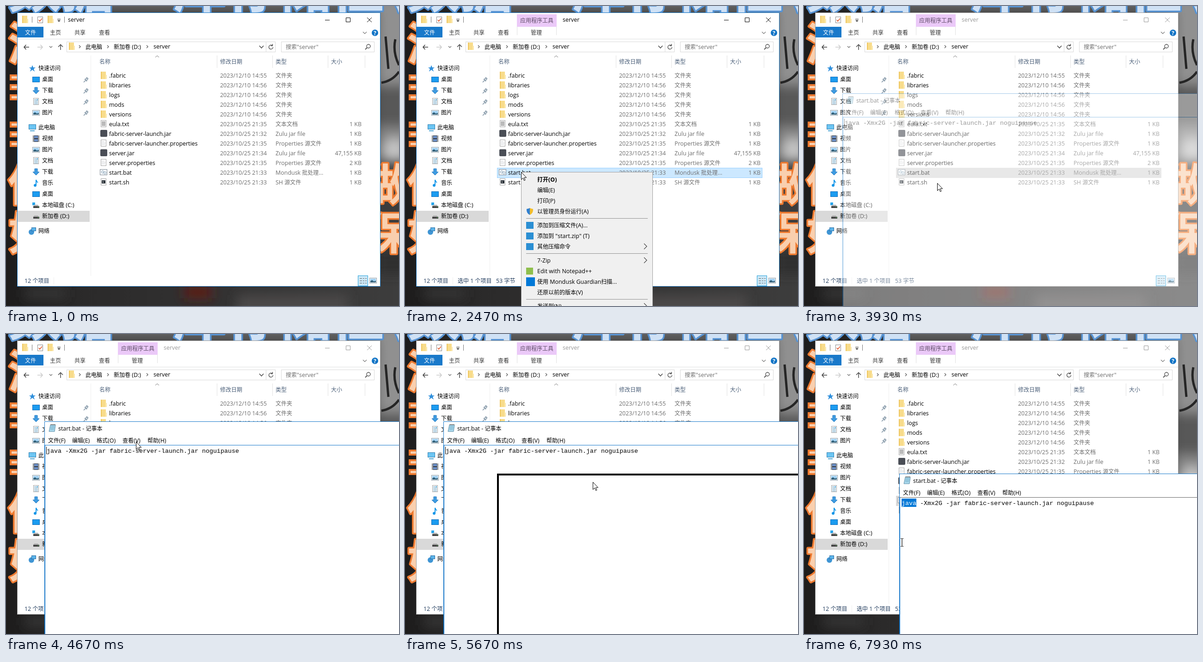
An HTML page for the animation above (8000 ms loop, 850 by 649 pixels).

```html
<!DOCTYPE html>
<html lang="zh-CN">
<head>
<meta charset="utf-8">
<title>server</title>
<style>
html,body{margin:0;width:100%;height:100%;overflow:hidden;background:#222}
svg{display:block;width:850px;height:649px}
text{font:12.45px 'Open Sans','Noto Sans',sans-serif;white-space:pre}
.c{font-family:'Noto Sans CJK SC','Noto Sans CJK',sans-serif;font-size:12px}
.b,.b .c{font-weight:700}
.mono{font:13.333px 'Liberation Mono',monospace}
.big{font:900 96px 'Noto Sans CJK SC','Noto Sans CJK',sans-serif;paint-order:stroke;stroke-width:7;stroke-linejoin:round}
.a{animation:8s step-end infinite}
@keyframes plain{0%{opacity:1}15.833%,to{opacity:0}}
@keyframes tool{0%{opacity:0}15.833%,to{opacity:1}}
@keyframes pick{0%{opacity:0}15%,to{opacity:1}}
@keyframes active{0%{opacity:1}48.333%,to{opacity:0}}
@keyframes idle{0%{opacity:0}48.333%,to{opacity:1}}
@keyframes menu{0%,47.5%,to{opacity:0}30.833%{opacity:1}}
@keyframes hover{
  0%{opacity:0;transform:none}
  37.5%{opacity:1;transform:none}
  42.5%,to{opacity:1;transform:translateY(23px)}}
@keyframes note{
  0%{opacity:0;transform:none}
  48.333%{opacity:.4;transform:none}
  49.167%{opacity:.8;transform:none}
  50%{opacity:1;transform:none}
  73.333%,to{opacity:1;transform:translate(123px,113px)}}
@keyframes dropped{0%{opacity:0}73.333%,to{opacity:1}}
@keyframes caret{0%{opacity:1}84.5%,to{opacity:0}}
@keyframes drag{
  0%,73.333%,to{opacity:0;transform:translate(199px,302px)}
  64.125%{opacity:1;transform:translate(81px,206px);animation-timing-function:steps(5)}
  68.333%{opacity:1;transform:translate(199px,300px)}
  70.833%{opacity:1;transform:translate(199px,302px)}}
@keyframes select{
  0%{clip-path:inset(0 0 0 100%)}
  83.333%{clip-path:inset(0 0 0 100%);animation-timing-function:steps(4)}
  89.167%,to{clip-path:inset(0 0 0 0%)}}
@keyframes arrow{0%,78.333%,to{opacity:0}5%{opacity:1}}
@keyframes beam{0%{opacity:0}78.333%,to{opacity:1}}
@keyframes move{
  0%{transform:translate(270px,541px)}
  5%{transform:translate(270px,541px);animation-timing-function:steps(6)}
  10%{transform:translate(251px,358px)}
  12.5%{transform:translate(251px,359px)}
  35.833%{transform:translate(251px,359px);animation-timing-function:steps(9)}
  43.333%{transform:translate(294px,394px)}
  48.333%{transform:translate(288px,383px)}
  51.667%{transform:translate(288px,383px);animation-timing-function:steps(5)}
  55.833%{transform:translate(248px,300px);animation-timing-function:steps(3)}
  58.333%{transform:translate(281px,233px);animation-timing-function:steps(5)}
  62.5%{transform:translate(283px,207px)}
  64.125%{transform:translate(287px,224px);animation-timing-function:steps(5)}
  68.333%{transform:translate(406px,318px)}
  70.833%{transform:translate(406px,320px)}
  72.5%{transform:translate(406px,320px);animation-timing-function:steps(9)}
  80%{transform:translate(260px,369px);animation-timing-function:steps(2)}
  81.625%{transform:translate(249px,366px)}
  82.5%{transform:translate(249px,366px);animation-timing-function:steps(9)}
  90%{transform:translate(203px,366px)}
  95%{transform:translate(203px,366px);animation-timing-function:steps(2)}
  96.667%{transform:translate(195px,400px);animation-timing-function:steps(3)}
  99.125%,to{transform:translate(212px,451px)}}
</style>
</head>
<body>
<svg id="stage" viewBox="0 0 850 649"></svg>
<script>
const BLUE = '#1979ca', GRAY = '#6d6d6d';

// y is the middle of the line
const text = (x, y, s, fill = '#000', attr = '') =>
  `<text x="${x}" y="${y + 5}" fill="${fill}" ${attr}>` +
  s.replace(/[\u3400-\u9fff]+/g, '<tspan class="c">$&</tspan>') + '</text>';
const rect = (x, y, w, h, fill, attr = '') =>
  `<rect x="${x}" y="${y}" width="${w}" height="${h}" fill="${fill}" ${attr}/>`;
const box = (x, y, w, h, fill, line) =>
  rect(x + .5, y + .5, w - 1, h - 1, fill, `stroke="${line}"`);
const path = (d, stroke, width = 1, fill = 'none') =>
  `<path d="${d}" stroke="${stroke}" stroke-width="${width}" fill="${fill}"/>`;
const disc = (x, y, r, fill, attr = '') =>
  `<circle cx="${x}" cy="${y}" r="${r}" fill="${fill}" ${attr}/>`;
const at = (x, y, body) => `<g transform="translate(${x} ${y})">${body}</g>`;
const anim = (name, ...body) =>
  `<g class="a" style="animation-name:${name}">${body.join('')}</g>`;

// Icons are drawn around their centre
const page = box(-6, -8, 12, 15, '#fff', '#a5a5a5');
const disk = path('M-6 1L-4-2H4L6 1Z', 'none', 0, '#b5b5b5') + rect(-6, 1, 13, 4, '#444') + rect(4, 2, 2, 1, '#5fd35f');
const picture = box(-8, -6, 16, 12, '#fff', '#8a9aa5') + rect(-6, -4, 12, 8, '#9fd0f2') +
  path('M-6 4V1L-2-1L2 2L6 0V4Z', 'none', 0, '#33617a');
const icon = {
  folder: rect(-6, -8, 11, 16, '#f8dc8b') + rect(-6, -8, 2, 16, '#eec660') + rect(4, -1, 3, 9, '#fbe8ad'),
  txt: page + path('M-4-4.5H4M-4-2.5H4M-4-.5H4M-4 1.5H4M-4 3.5H4', '#777'),
  jar: rect(-7, -8, 15, 15, '#4a4e56', 'rx="2"'),
  prop: page + path('M-4-3.5H2M-4-.5H4M-4 2.5H3', '#cfd2d6'),
  bat: box(-8, -7, 16, 13, '#f6f8fa', '#7f8a94') + disc(-2, -1, 2.5, 'none', 'stroke="#7f9db4"') + disc(3, 1, 2.5, 'none', 'stroke="#7f9db4"'),
  sh: page + rect(-4, -4, 8, 7, '#2c333a') + path('M-2-2L0 0L-2 1', '#ddd'),
  star: path('M0-7L2-2L7-2L3 1L5 7L0 3L-5 7L-3 1L-7-2L-2-2Z', 'none', 0, '#2f8fdc'),
  desk: box(-8, -6, 16, 12, '#1c9cf0', '#0c6ab8'),
  down: path('M-3-7H3V0H7L0 7L-7 0H-3Z', '#1f77bf', 1, '#3f9ce2'),
  doc: page + path('M-4-4.5H0M-4-1.5H4M-4 1.5H4M-4 4.5H4', '#4b8fb8') + rect(1, -6, 3, 3, '#6db4dc'),
  picture,
  pc: box(-8, -7, 16, 11, '#6cc5f3', '#2f7fb0') + rect(-5, 6, 10, 2, '#4aa3d4'),
  video: rect(-7, -7, 14, 14, '#33383f') + rect(-4, -6, 8, 5, '#6b8fc7') + rect(-4, 1, 8, 5, '#6b8fc7') +
    path('M-5.5-7V7M5.5-7V7', '#ddd', 1.5),
  music: path('M0 5V-7Q1-3 4-1', '#1596e8', 2) + disc(-2, 5, 3, '#1596e8'),
  sys: rect(-8, -6, 6, 6, '#2aa5ea') + at(0, 1, disk),
  disk,
  net: disc(-2, 2, 6, '#3f95d4') + box(-2, -8, 10, 8, '#5bb4ea', '#2b6ea5')
};
const put = (name, x, y) => at(x, y, icon[name]);

function backdrop() {
  const bars = [150, 171, 193, 252, 273, 294].map(y =>
    rect(10, y, 22, 9, '#f9cfae', 'stroke="#ee7a30" stroke-width="4"')).join('');
  const glyphs = (x, y, s, warm, size = 96) =>
    `<text class="big" x="${x}" y="${y}" style="font-size:${size}px" ` +
    `fill="${warm ? '#f9cfae' : '#cfe1f5'}" stroke="${warm ? '#ee7a30' : '#5793d3'}">${s}</text>`;
  return `<defs><filter id="soft" x="-60%" y="-60%" width="220%" height="220%"><feGaussianBlur stdDeviation="12"/></filter>
    <linearGradient id="wall"><stop stop-color="#1d1c1c"/><stop offset=".2" stop-color="#2b2a2a"/>
    <stop offset=".6" stop-color="#343333"/><stop offset="1" stop-color="#3d3d3d"/></linearGradient></defs>` +
    rect(0, 0, 850, 649, 'url(#wall)') +
    `<g filter="url(#soft)">` + rect(210, -40, 640, 56, '#626262') + rect(800, -20, 90, 190, '#909090') +
    rect(800, 170, 90, 90, '#585858') + rect(800, 260, 90, 80, '#858585') + disc(840, 310, 24, '#c4c4c4') +
    rect(800, 530, 90, 50, '#2e2e2e') + rect(385, 606, 60, 26, '#5e1c17') + rect(40, 612, 90, 20, '#383737') +
    rect(500, 625, 240, 50, '#4b4949') + '</g>' +
    path('M821 66L827 136M842 72Q836 100 850 128M812 166Q836 162 850 142', '#252525', 5) +
    glyphs(5, 3, '数据', 0, 114) + glyphs(362, 3, '库存储性手', 0, 114) +
    glyphs(5, 116, '测', 1) + bars + glyphs(5, 421, '你', 1) + glyphs(5, 526, '如', 1) +
    glyphs(777, 421, '做', 1) + glyphs(777, 526, '保', 1);
}

const buttons = c => path('M690 30.5H700M735.5 25.5H744.5V34.5H735.5ZM781 25L791 35M791 25L781 35', c);

function frame() {
  const chevrons = [160, 221, 306].map(x => path(`M${x - 2} 85L${x + 1} 88L${x - 2} 91`, '#555', 1.2)).join('');
  return rect(25, 15, 784, 591, '#fff') +
    anim('active', box(24, 14, 786, 593, 'none', BLUE), buttons('#000')) +
    anim('idle', box(24, 14, 786, 593, 'none', '#9a9a9a'), buttons('#999')) +
    put('folder', 41, 29) + put('folder', 96, 29) + path('M56.5 23V36M126.5 23V36', '#777') +
    at(74, 30, box(-6, -7, 12, 14, '#fff', '#8b8b8b') + path('M-3 0L-1 3L4-3', '#e0552b', 1.6)) +
    path('M111 28.5H118', '#222') + path('M111 31H118L114.5 34Z', 'none', 0, '#222') +
    anim('plain', text(134, 29, 'server')) +
    anim('tool', rect(242, 18, 86, 27, '#ebc9f8'), path('M242.5 45V63M327.5 45V63', '#e0e0e0'),
      text(249, 31, '应用程序工具', '#5d4a66'), text(272, 57, '管理', '#333'),
      anim('active', text(341, 29, 'server')), anim('idle', text(341, 29, 'server', '#999'))) +
    rect(25, 45, 56, 23, BLUE) + text(41, 57, '文件', '#fff') +
    text(95, 57, '主页', '#333') + text(148, 57, '共享', '#333') + text(201, 57, '查看', '#333') +
    path('M25 71.5H809', '#dfe0e1') + path('M772 56L776 60L780 56', '#777', 1.2) +
    disc(798, 58, 7, '#0f73c5') + text(795, 58, '?', '#fff', 'class="b"') +
    path('M50 89H39M43.5 84L39 89L43.5 94', '#444', 1.6) + path('M68 89H79M74.5 84L79 89L74.5 94', '#ccc', 1.6) +
    path('M94 87L97 90L100 87', '#666', 1.2) + path('M118 95V84M113 88.5L118 83.5L123 88.5', '#555', 1.6) +
    box(131, 77, 452, 23, '#fff', '#d9d9d9') + put('folder', 142, 87) + chevrons +
    text(172, 88, '此电脑') + text(233, 88, '新加卷 (D:)') + text(319, 87, 'server') +
    path('M548 86L552.5 91L557 86', '#444', 1.5) + path('M562.5 78V99', '#d9d9d9') +
    path('M576 85.5A4.5 4.5 0 1 0 577.5 89M576.5 82V86H572.5', '#555', 1.4) +
    box(595, 77, 202, 23, '#fff', '#d9d9d9') + text(605, 88, '搜索"server"', GRAY) +
    disc(784, 87, 4, 'none', 'stroke="#555" stroke-width="1.4"') + path('M781 90L777 94', '#555', 1.8) +
    path('M323 111L327 107.5L331 111', '#777') + path('M456.5 107V134M576.5 107V134M696.5 107V134M776.5 107V134', '#e2e2e2') +
    [[202, '名称'], [463, '修改日期'], [583, '类型'], [703, '大小']].map(([x, s]) => text(x, 120, s, '#4c607a')).join('') +
    path('M183.5 107V584M103.5 587V602', '#eee') +
    text(40, 594, '12 个项目', '#1e395b') +
    anim('tool', text(114, 594, '选中 1 个项目', '#1e395b'), text(197, 594, '53 字节', '#1e395b')) +
    box(761, 583, 22, 23, '#cce8f7', '#26a0da') +
    path('M765 589.5H770M765 594.5H770M765 599.5H770M772 589.5H775M777 589.5H780M772 594.5H775M777 594.5H780M772 599.5H775M777 599.5H780', '#666') +
    at(794, 594, picture);
}

function sidebar() {
  const items = [
    ['star', '快速访问', 134, 0], ['desk', '桌面', 158, 1], ['down', '下载', 182, 1], ['doc', '文档', 206, 1],
    ['picture', '图片', 230, 1], ['pc', '此电脑', 262, 0], ['video', '视频', 286, 1], ['picture', '图片', 310, 1],
    ['doc', '文档', 334, 1], ['down', '下载', 358, 1], ['music', '音乐', 382, 1], ['desk', '桌面', 406, 1],
    ['sys', '本地磁盘 (C:)', 430, 1], ['disk', '新加卷 (D:)', 454, 1], ['net', '网络', 486, 0]];
  const pin = path('M1-5L5-1M2-3L-2 0M4-2L1 3M-3-1L2 4M-1 2L-5 6', '#8296a6', 1.6);
  return rect(25, 443, 156, 24, '#d9d9d9') + items.map(([i, s, y, sub]) =>
    put(i, 57 + 8 * sub, y + 1) + text(70 + 8 * sub, y, s) +
    (sub && y < 240 ? at(173, y + 1, pin) : '')).join('');
}

function files() {
  const dir = (name, min) => ['folder', name, `2023/12/10 14:${min}`, '文件夹', ''];
  const file = (i, name, min, type, size) => [i, name, `2023/10/25 21:${min}`, type, size + ' KB'];
  const rows = [
    dir('.fabric', 55), dir('libraries', 56), dir('logs', 56), dir('mods', 56), dir('versions', 56),
    file('txt', 'eula.txt', 35, '文本文档', 1),
    file('jar', 'fabric-server-launch.jar', 32, 'Zulu jar file', 1),
    file('prop', 'fabric-server-launcher.properties', 35, 'Properties 源文件', 1),
    file('jar', 'server.jar', 34, 'Zulu jar file', '47,155'),
    file('prop', 'server.properties', 35, 'Properties 源文件', 2),
    file('bat', 'start.bat', 33, 'Mondusk 批处理...', 1),
    file('sh', 'start.sh', 33, 'SH 源文件', 1)];
  return anim('pick', anim('active', box(199, 350, 574, 22, '#cce8ff', '#99d1ff')),
    anim('idle', rect(199, 350, 574, 22, '#d9d9d9'))) +
    rows.map(([i, name, date, type, size], n) => {
      const y = 150 + 21 * n;
      return put(i, 211, y) + text(223, y, name) + text(463, y, date, GRAY) + text(583, y, type, GRAY) +
        text(769, y, size, GRAY, 'text-anchor="end"');
    }).join('');
}

function menu() {
  const items = [[375, '打开(O)'], [398, '编辑(E)'], [421, '打印(P)'], [444, '以管理员身份运行(A)'],
    [474, '添加到压缩文件(A)...'], [497, '添加到 "start.zip" (T)'], [520, '其他压缩命令'], [550, '7-Zip'],
    [573, 'Edit with Notepad++'], [596, '使用 Mondusk Guardian扫描...'], [619, '还原以前的版本(V)'], [649, '发送到(N)']];
  return anim('menu',
    box(251, 359, 285, 310, '#f0f0f0', '#a0a0a0'),
    anim('hover', rect(254, 364, 279, 23, '#d9d9d9')),
    path('M262 459.5H525M262 535.5H525M262 634.5H525', '#919191'),
    [520, 550, 649].map(y => path(`M517 ${y - 6}L523 ${y}L517 ${y + 6}`, '#444', 1.2)).join(''),
    path('M270 437Q266 439 263 439Q262 448 270 452Z', 'none', 0, '#2f7fd0'),
    path('M270 437Q274 439 277 439Q278 448 270 452Z', 'none', 0, '#f2bd2c'),
    [474, 497, 520].map(y => rect(262, y - 7, 16, 15, '#2b8fd3')).join(''),
    rect(262, 566, 15, 15, '#8fbf4d'), rect(262, 587, 19, 19, '#0078d7'),
    items.map(([y, s], n) => text(286, y, s, '#000', n ? '' : 'class="b"')).join(''));
}

function notepad() {
  const line = 'java -Xmx2G -jar fabric-server-launch.jar noguipause';
  const items = [[91, '文件(F)'], [143, '编辑(E)'], [196, '格式(O)'], [252, '查看(V)'], [306, '帮助(H)']];
  return anim('note',
    rect(83, 189, 800, 500, '#fff'), path('M850 189.5H83.5V700', BLUE),
    at(100, 204, path('M-4-7H7L5 7H-7Z', '#5f8fa8', 1, '#a9d8ec') + path('M-3-4H5M-4-1H5M-4 2H4', '#6aa3bd') + path('M-4-8H7', '#777', 1.5)),
    text(113, 204, 'start.bat - 记事本'), items.map(([x, s]) => text(x, 230, s)).join(''),
    path('M84 240.5H850M84.5 240V700', BLUE),
    anim('dropped', path('M85 240.5H850', '#666')),
    text(88, 252, line, '#000', 'class="mono"'),
    anim('caret', path('M87.5 244V260', '#000')),
    anim('select', rect(88, 243, 32, 18, '#0078d7'), text(88, 252, 'java', '#fff', 'class="mono"')));
}

const cursor = anim('move',
  anim('arrow', path('M.5.5V16.5L4.2 13L6.7 18.6L9 17.6L6.6 12.2H11.6Z', '#000', 1, '#fff')),
  anim('beam', path('M-3-8.5H-.5M.5-8.5H3M0-8V8M-3 8.5H-.5M.5 8.5H3', '#000', 1.2)));

document.getElementById('stage').innerHTML = backdrop() + frame() + sidebar() + files() + menu() + notepad() +
  anim('drag', rect(2, 2, 900, 700, 'none', 'stroke="#000" stroke-width="4"')) + cursor;
</script>
</body>
</html>
```
